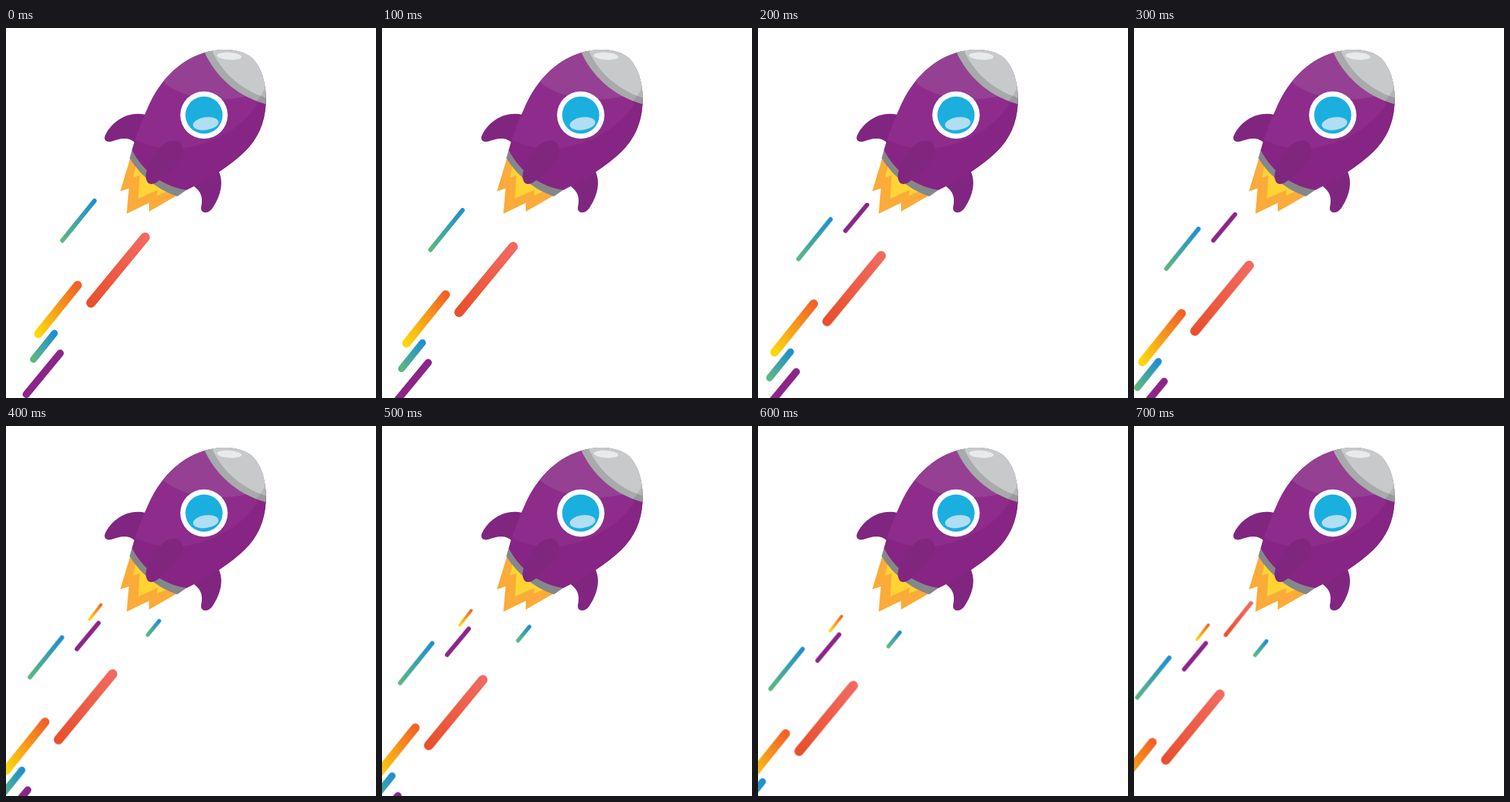
An HTML page that plays this animation: 512 px wide and 512 px high, repeating every 0.8 s.

```html
<!DOCTYPE html>
<html lang="en">
<head>
<meta charset="utf-8">
<title>Rocket</title>
<style>
  html, body { margin: 0; width: 100%; height: 100%; overflow: hidden; background: #fff; }
  svg { display: block; width: 100vw; height: 100vh; }

  .trails { fill: none; stroke-linecap: round; animation: fall .8s step-end infinite; }
  .rocket { animation: shake .2s step-end infinite; }
  .late { visibility: hidden; animation: .8s step-end infinite; }
  .second { animation-name: from-second; }
  .fourth { animation-name: from-fourth; }
  .last { animation-name: from-last; }

  @keyframes shake {
    0%, 100% { transform: none; }
    50% { transform: translate(1px, 0); }
  }
  @keyframes fall {
    0%, 100% { transform: none; }
    12.5% { transform: translate(-11px, 13px); }
    25% { transform: translate(-22px, 25.6px); }
    37.5% { transform: translate(-33.3px, 39px); }
    50% { transform: translate(-45px, 53.6px); }
    62.5% { transform: translate(-53px, 61.6px); }
    75% { transform: translate(-60.7px, 69.6px); }
    87.5% { transform: translate(-73.6px, 81.6px); }
  }
  @keyframes from-second { 0% { visibility: hidden; } 25%, 100% { visibility: visible; } }
  @keyframes from-fourth { 0% { visibility: hidden; } 50%, 100% { visibility: visible; } }
  @keyframes from-last { 0% { visibility: hidden; } 87.5%, 100% { visibility: visible; } }
</style>
</head>
<body>
<svg viewBox="0 0 512 512">
  <defs>
    <linearGradient id="teal" x1="0" y1="1" x2="1" y2="0">
      <stop offset="0" stop-color="#5bb880"/><stop offset="1" stop-color="#1f8fd0"/>
    </linearGradient>
    <linearGradient id="red" x1="0" y1="1" x2="1" y2="0">
      <stop offset="0" stop-color="#e8502e"/><stop offset="1" stop-color="#f26a60"/>
    </linearGradient>
    <linearGradient id="gold" x1="0" y1="1" x2="1" y2="0">
      <stop offset="0" stop-color="#fdd70d"/><stop offset="1" stop-color="#f26226"/>
    </linearGradient>
    <path id="hull" d="M275 34C300 27 326 29 341 42C355 56 361 80 359.500 106C358 131 349 153 330.500 171C310 191 284 207 250 224C217 219 190 199 174.500 169C179 152 187 130 198 106C212 76 236 46 275 34Z"/>
    <clipPath id="inside"><use href="#hull"/></clipPath>
  </defs>

  <g class="trails">
    <path d="M78 294L122.500 239" stroke="url(#teal)" stroke-width="6"/>
    <path d="M117.500 380.500L192.500 289.500" stroke="url(#red)" stroke-width="13"/>
    <path d="M45 423L99 356" stroke="url(#gold)" stroke-width="12"/>
    <path d="M38 458.500L67 422.500" stroke="url(#teal)" stroke-width="9.500"/>
    <path d="M28 507L75 450" stroke="#8b2589" stroke-width="10"/>
    <path class="late second" d="M143 255L173 219" stroke="#8b2589" stroke-width="6"/>
    <path class="late fourth" d="M160.500 214L176.500 193.500" stroke="url(#gold)" stroke-width="4"/>
    <path class="late fourth" d="M241 235.500L257 216" stroke="url(#teal)" stroke-width="5.300"/>
    <path class="late last" d="M200.500 207.500L235.500 163.500" stroke="url(#red)" stroke-width="5.700"/>
  </g>

  <g class="rocket">
    <path fill="#fbab39" d="M172 180L158 226L170 222L167 257L198 242L198 254L238 231Z"/>
    <path fill="#fed433" d="M180 188L176 207L185 204L183 236L210 224L209 232L223 226L205 205Z"/>

    <g fill="#812680">
      <path d="M193 120C170 115 149 127 138 147C134 154 138 159 146 157C158 153 169 150 179 159Z"/>
      <path d="M293 196C302 211 298 231 286 249C280 258 269 257 270 248C273 235 270 226 260 219Z"/>
    </g>

    <path fill="#85878a" d="M175 167L171 180C187 206 212 225 237 233L250 224Z"/>

    <use href="#hull" fill="#8e2c8b"/>
    <g clip-path="url(#inside)">
      <path fill="#964093" d="M216 73C238 95 287 105 335 94L275 20Z"/>
      <path fill="#862583" d="M170 150C212 174 254 170 291 153C328 136 350 110 362 78L390 240H160Z"/>
      <path fill="#a9aaac" d="M274 32C289 66 319 95 362 106L380 20H270Z"/>
      <path fill="#c8c9cb" d="M283 26C295 58 323 86 364 98L380 20Z"/>
      <path fill-opacity=".1" d="M345 102.500C353 94 357 87 361 75L370 108Z"/>
    </g>
    <ellipse cx="309" cy="39" rx="17" ry="5" transform="rotate(4 309 39)" fill="#e9eaeb"/>

    <circle cx="274" cy="120.500" r="32.800" fill="#fff"/>
    <circle cx="274" cy="120.500" r="25.700" fill="#1bafdf"/>
    <ellipse cx="276.500" cy="132.300" rx="17.800" ry="8.800" transform="rotate(-8 276.500 132.300)" fill="#b0def2"/>

    <path fill="#80267e" d="M194 209C191 197 205 174 216 163C226 153 242 153 244 165C246 181 225 200 213 210C204 218 196 218 194 209Z"/>
  </g>
</svg>
</body>
</html>
```
